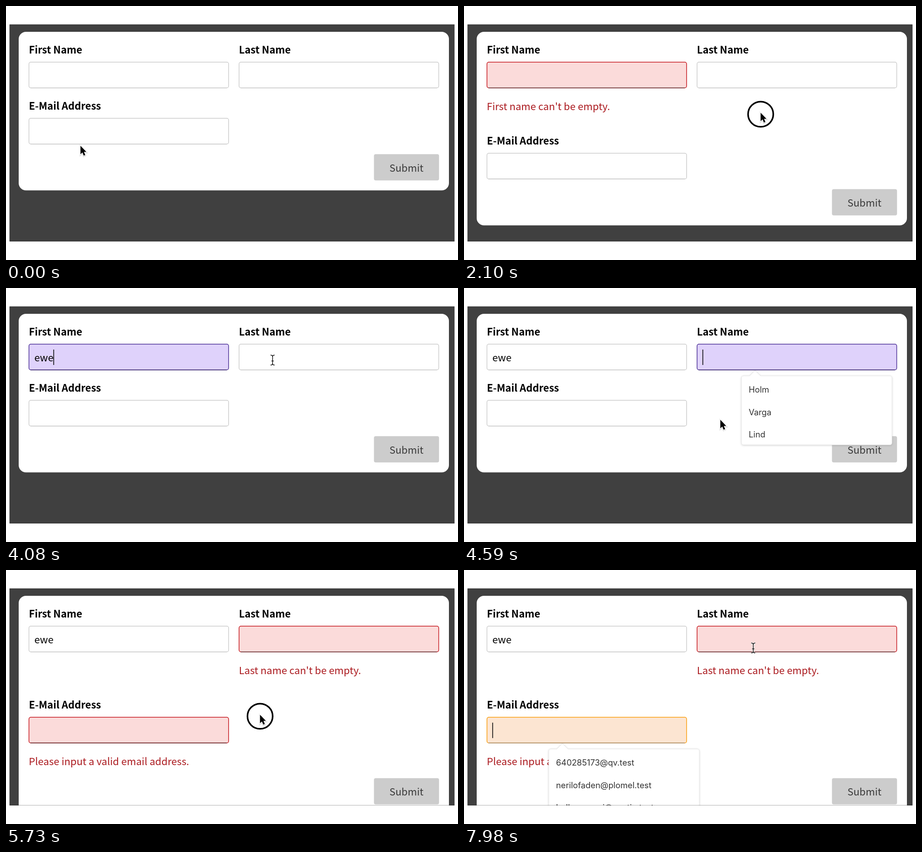
An HTML page that plays this animation: 997x561 px, repeating every 8000 ms.

```html
<!DOCTYPE html>
<html lang="en">
<head>
<meta charset="utf-8">
<title>Form validation</title>
<style>
html, body { margin: 0; width: 100%; height: 100%; overflow: hidden; background: #fff; }
svg { display: block; width: 100vw; height: 100vh; }
text { font: 22.1px "Noto Sans CJK SC", "Noto Sans CJK JP", "Noto Sans CJK", "Noto Sans", sans-serif; }
.label { font-weight: 700; }
.error { fill: #ab1a1f; }
.hint { font: 18.3px Inter, Roboto, sans-serif; fill: #333; }
</style>
</head>
<body>
<svg id="stage" viewBox="0 0 997 561" xmlns="http://www.w3.org/2000/svg">
  <defs>
    <clipPath id="view"><rect x="7.5" y="40.5" width="982" height="479.7"/></clipPath>
    <filter id="soft" x="-10%" y="-10%" width="120%" height="120%">
      <feDropShadow dx="0" dy="1" stdDeviation="2" flood-opacity=".16"/>
    </filter>
  </defs>
  <g id="scene" clip-path="url(#view)"></g>
  <g id="pointer"></g>
</svg>
<script>
const LOOP = 8000, STEP = 30;
const MOVE = 330, HOLD = 150, PRESS = 60, RING = 180, BLINK = 510;
const LEFT = 50, COLUMN = 463.5, TOP = 123.5, W = 441, H = 57;
const scene = document.getElementById('scene');
const pointer = document.getElementById('pointer');

// Where the pointer arrives, when, and what it clicks there
const stop = (t, x, y, click, list) => ({ t, x, y, click, list });
const stops = [
  stop(0, 164, 309),
  stop(780, 187, 167, 'window'),
  stop(1200, 187, 167, 'first', true),
  stop(2010, 654, 236, 'outside'),
  stop(2730, 459, 195),
  stop(2940, 240, 160, 'first', true),
  stop(4080, 588, 159, 'last', true),
  stop(4680, 560, 321, 'outside'),
  stop(4980, 522, 269),
  stop(5160, 300, 355, 'email', true),
  stop(5520, 560, 320, 'outside'),
  stop(6090, 400, 355, 'email'),
  stop(6540, 585, 301),
  stop(6750, 700, 222),
  stop(7080, 560, 405),
  stop(7440, 217, 355, 'email', true),
  stop(7950, 638, 172)
];
const typing = { text: 'ewe', start: 3690, gap: 120 };
typing.end = typing.start + typing.gap * (typing.text.length - 1);

const hints = {
  first: ['Marla', 'Teodor', 'Ines', 'Wen'],
  last: ['Holm', 'Varga', 'Lind'],
  email: ['640285173@qv.test', 'nerilofaden@plomel.test', 'bellormuravi@postio.test', 'tamsin@qv.test']
};
const messages = {
  first: "First name can't be empty.",
  last: "Last name can't be empty.",
  email: 'Please input a valid email address.'
};
// Fill, edge and bottom edge
const styles = {
  idle: ['#fff', '#ccc', '#ccc'],
  focus: ['#dfd2fb', '#4b2f96', '#3d2b70'],
  invalid: ['#fbdbda', '#c5161d', '#65393b'],
  retry: ['#fce5d2', '#fa9d0c', '#a2917f']
};

// Replays clicks and keys up to time t; leaving an empty field marks it invalid
function replay(t) {
  const form = { focus: null, list: false, caretFrom: 0, value: '', invalid: {} };
  const type = now => {
    if (now < typing.start) return;
    const n = Math.min(typing.text.length, 1 + Math.floor((now - typing.start) / typing.gap));
    form.value = typing.text.slice(0, n);
    form.invalid.first = false;
    if (form.focus === 'first') {
      form.list = false;
      form.caretFrom = typing.start + (n - 1) * typing.gap;
    }
  };
  for (const s of stops) {
    const now = s.t + PRESS;
    if (now > t) break;
    if (!s.click || s.click === 'window') continue;
    type(now);
    const next = s.click === 'outside' ? null : s.click;
    const old = form.focus;
    if (old && old !== next) form.invalid[old] = old !== 'first' || !form.value;
    form.focus = next;
    form.list = next && s.list;
    form.caretFrom = now;
  }
  type(t);
  return form;
}

function layout(invalid) {
  const push = invalid.first || invalid.last ? 77.2 : 0;
  const end = push + (invalid.email ? 55.2 : 0);
  return {
    fields: { first: [LEFT, TOP], last: [LEFT + COLUMN, TOP], email: [LEFT, 247.5 + push] },
    buttonY: 327.3 + end,
    cardEnd: 407.2 + end
  };
}

function position(t) {
  const i = stops.findLastIndex(s => s.t <= t);
  const a = stops[i], b = stops[i + 1];
  if (!b) return [a.x, a.y];
  const start = Math.max(a.t + (a.click ? HOLD : 0), b.t - MOVE);
  const u = Math.max(0, (t - start) / (b.t - start));
  const e = u * u * (3 - 2 * u);
  return [a.x + (b.x - a.x) * e, a.y + (b.y - a.y) * e];
}

const text = (x, y, s, cls = '', extra = '') => `<text x="${x}" y="${y}" class="${cls}" ${extra}>${s}</text>`;
const box = (x, y, w, h, r, fill, extra = '') =>
  `<rect x="${x}" y="${y}" width="${w}" height="${h}" rx="${r}" fill="${fill}" ${extra}/>`;

function field(x, y, style) {
  const [fill, edge, base] = styles[style];
  return box(x + .6, y + .6, W - .6, H - .4, 4, fill, `stroke="${edge}" stroke-width="1.5"`) +
    `<path d="M${x + 4} ${y + H + .2}H${x + W - 4}" stroke="${base}" stroke-width="1.5"/>`;
}

function suggestions(fieldX, fieldY, rows) {
  const x = Math.min(fieldX + 137, 612), y = fieldY + 70.5, r = x + 332;
  const bottom = y + rows.length * 49.5 + 4;
  const outline = `M${x + 5} ${y}H${x + 18}l12 -12l12 12H${r - 5}q5 0 5 5` +
    `V${bottom - 5}q0 5 -5 5H${x + 5}q-5 0 -5 -5V${y + 5}q0 -5 5 -5Z`;
  return `<path d="${outline}" fill="#fff" stroke="#dcdcdc" stroke-width=".8" filter="url(#soft)"/>` +
    rows.map((s, i) => text(x + 16, y + 37 + i * 49.5, s, 'hint')).join('');
}

function drawForm(t, form, { fields, buttonY, cardEnd }) {
  const { focus, invalid, value } = form;
  const mailY = fields.email[1];
  let s = box(7.5, 40.5, 982, 479.7, 0, '#404040') +
    box(28, 57, 949, cardEnd - 57, 16, '#fff') +
    text(50.5, 105, 'First Name', 'label') +
    text(513.8, 105, 'Last Name', 'label') +
    text(50.5, mailY - 18.5, 'E-Mail Address', 'label');
  for (const name in fields) {
    const [x, y] = fields[name];
    const style = focus === name ? (invalid[name] ? 'retry' : 'focus') : (invalid[name] ? 'invalid' : 'idle');
    s += field(x, y, style);
    if (invalid[name]) s += text(x + .3, y + 106, messages[name], 'error');
  }
  s += text(62.5, 162, value) +
    box(811.6, buttonY, 143.6, 58, 4, '#ccc') +
    text(883.3, buttonY + 38.5, 'Submit', '', 'text-anchor="middle" fill="#3a3a3a"');
  if (focus) {
    const [x, y] = fields[focus];
    const shift = focus === 'first' ? value.length * 14 : 0;
    if ((t - form.caretFrom) % (2 * BLINK) < BLINK) s += box(x + 12.4 + shift, y + 12.5, 1.7, 34, 0, '#111');
    if (form.list) s += suggestions(x, y, hints[focus]);
  }
  return s + box(8, 41, 981, 478.7, 0, 'none', 'stroke="#000" stroke-opacity=".35"');
}

function drawPointer(t, { fields }) {
  const [x, y] = position(t);
  const inside = Object.values(fields).some(([fx, fy]) => x > fx && x < fx + W && y > fy && y < fy + H);
  const age = s => t - s.t - PRESS;
  let s = '';
  if (stops.some(p => p.click && age(p) >= 0 && age(p) < RING))
    s += `<circle cx="${x + .4}" cy="${y + 3}" r="27.8" fill="none" stroke="#000" stroke-width="3.5"/>`;
  if (t >= typing.start && t < typing.end) return s;
  if (inside) {
    const beam = 'M-4.5 -11Q0 -11 0 -7.5Q0 -11 4.5 -11M0 -8V8M-4.5 11Q0 11 0 7.5Q0 11 4.5 11M-2.5 2H2.5';
    const stroke = (color, w) => `<path d="${beam}" fill="none" stroke="${color}" stroke-width="${w}"/>`;
    return s + `<g transform="translate(${x} ${y + .3})">${stroke('#fff', 3.2)}${stroke('#111', 1.5)}</g>`;
  }
  const arrow = 'M0 0V18.8L4.2 14.9L7.2 21.8L10.6 20.3L7.6 13.6H13Z';
  return s + `<g transform="translate(${x + .3} ${y - .3})">` +
    `<path d="${arrow}" transform="translate(0 1.2)" fill="none" stroke="#000" stroke-opacity=".15" stroke-width="3.6"/>` +
    `<path d="${arrow}" stroke="#fff" stroke-width="2.4" paint-order="stroke"/></g>`;
}

function render(t) {
  const form = replay(t), place = layout(form.invalid);
  scene.innerHTML = drawForm(t, form, place);
  pointer.innerHTML = drawPointer(t, place);
}

let shown = -1;
const begin = performance.now();
function tick() {
  const elapsed = Math.max(0, performance.now() - begin);
  const t = Math.floor(elapsed % LOOP / STEP) * STEP;
  if (t !== shown) render(shown = t);
  requestAnimationFrame(tick);
}
tick();
</script>
</body>
</html>
```
